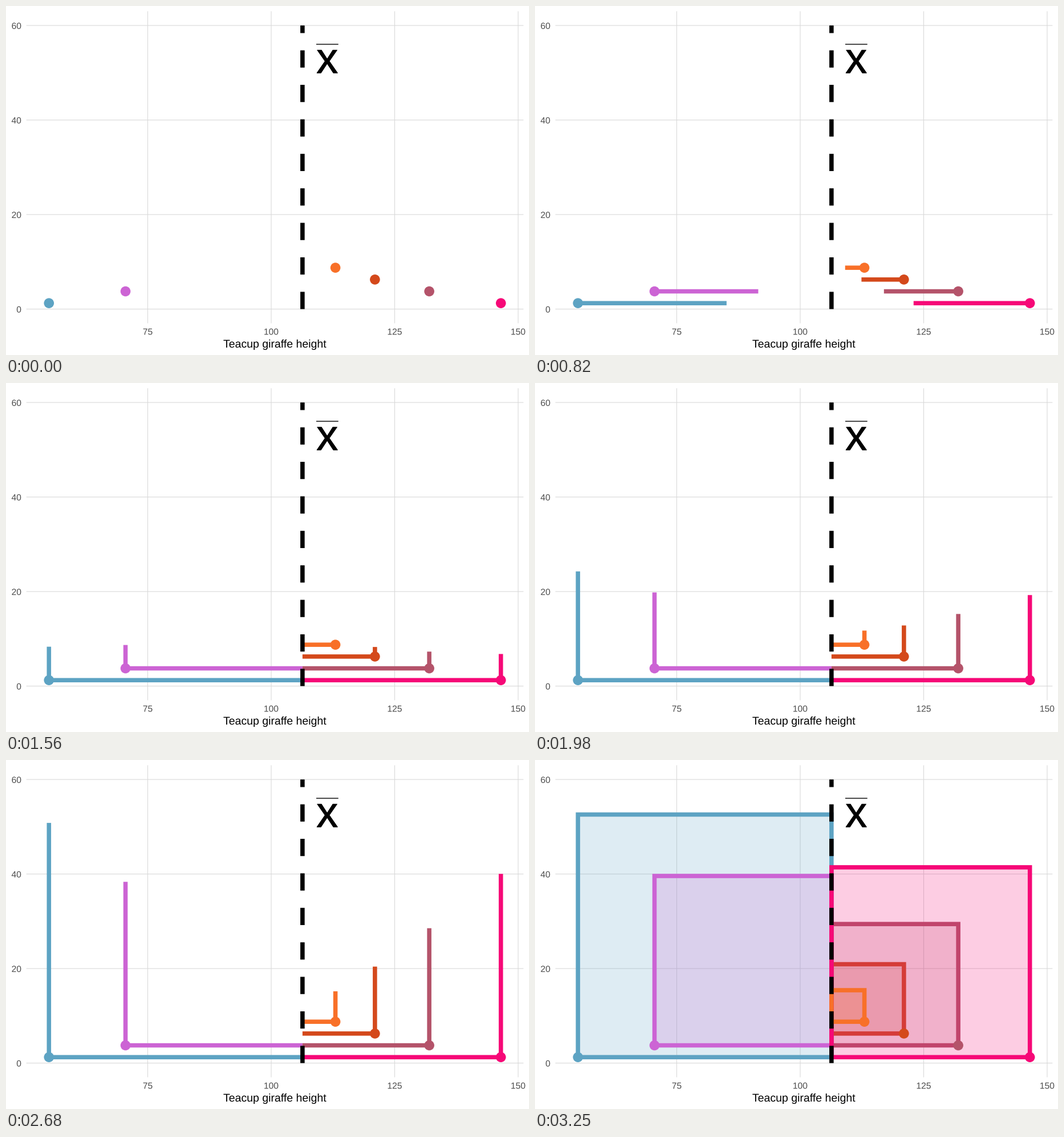
Write a matplotlib script that moves like this. It is 917 px wide and 611 px high and loops after 3.5 s.

```python
import numpy as np
import matplotlib.pyplot as plt
from matplotlib.animation import FuncAnimation
from matplotlib.patches import Circle, Rectangle
from matplotlib.patheffects import Normal, withStroke

W, H, DPI = 917, 611, 64
PT = 72 / DPI            # points per pixel
TICK_MS, LOOP_MS = 10, 3500
GROW, FADE = 29, 10      # steps per growing line and for the fade
STROKE = 7.55
UNIT_Y = 8.275           # pixels per unit of height

plt.rcParams["font.family"] = "Liberation Sans"


def px(x):
    return 465.0 + (x - 100) * 8.66


def py(y):
    return 530.6 - y * UNIT_Y


# height, level, colour; listed from back to front
POINTS = [
    (55.0, 1.25, "#5DA3C3"),
    (70.5, 3.75, "#CC64D4"),
    (121.0, 6.25, "#D4491B"),
    (132.0, 3.75, "#B4536A"),
    (146.5, 1.25, "#F60877"),
    (113.0, 8.75, "#F87028"),
]
MEAN = np.mean([p[0] for p in POINTS])

# How long each step stays: every third one lingers
grow_holds = [100 if k % 3 == 1 else 20 for k in range(2 * GROW + 2)]
fade_holds = [100 if k > 1 and k % 3 == 1 else 20 for k in range(1, FADE + 1)]
fade_holds[2] = 30
ENDS = np.cumsum(grow_holds + fade_holds + [250])
LAST = len(ENDS) - 1

fig = plt.figure(figsize=(W / DPI, H / DPI), dpi=DPI, facecolor="white")
ax = fig.add_axes([0, 0, 1, 1])
ax.set_xlim(0, W)
ax.set_ylim(H, 0)
ax.axis("off")


def line(xs, ys, color, width, z, **kw):
    return ax.plot(xs, ys, color=color, lw=width * PT, zorder=z, snap=False,
                   solid_capstyle="butt", dash_capstyle="butt", **kw)[0]


def label(x, y, text, size, color="black", ha="center", effect=Normal()):
    # Path effects draw the glyphs as outlines, free of pixel snapping
    ax.text(x, y, text, fontsize=size * PT, color=color, ha=ha,
            va="baseline", zorder=8, path_effects=[effect])


# Grid and axis labels
for v in (75, 100, 125, 150):
    line([px(v)] * 2, [py(63), py(-3)], "#D9D9D9", 1.1, 1)
    label(px(v), 575.5, str(v), 15.6, "#4D4D4D")
for v in (0, 20, 40, 60):
    line([px(50.425), px(151.075)], [py(v)] * 2, "#D9D9D9", 1.1, 1)
    label(27, py(v) + 6, str(v), 15.6, "#4D4D4D", "right")
label(471.7, 598, "Teacup giraffe height", 19.5)

# Mean line and its symbol
line([px(MEAN)] * 2, [py(0), py(60)], "black", STROKE, 6, linestyle=(0, (4, 4)))
label(544.2, 117.3, "x", 76, ha="left",
      effect=withStroke(linewidth=0.9, foreground="black"))
line([544, 582.7], [67, 67], "black", 1.4, 8)


class Deviation:
    """A point, its distance to the mean and the square on that distance."""

    def __init__(self, value, level, color):
        self.x, self.y, self.color = px(value), py(level), color
        self.dx = px(MEAN) - self.x
        self.dy = -abs(MEAN - value) * UNIT_Y
        self.square = ax.add_patch(Rectangle(
            (self.x, self.y), self.dx, self.dy, lw=STROKE * PT,
            joinstyle="miter", snap=False, zorder=3))
        self.across = line([], [], color, STROKE, 4)
        self.up = line([], [], color, STROKE, 4)
        ax.add_patch(Circle((self.x, self.y), 8.8, lw=0, color=color, zorder=5))

    def update(self, h, v, alpha, done):
        x, y = self.x, self.y
        self.across.set_data([x, x + self.dx * h], [y, y])
        self.up.set_data([x, x], [y, y + self.dy * v])
        self.across.set_visible(h > 0 and not done)
        self.up.set_visible(v > 0 and not done)
        self.square.set_visible(alpha > 0)
        self.square.set_facecolor((self.color, 0.2 * alpha))
        self.square.set_edgecolor((self.color, alpha))


deviations = [Deviation(*p) for p in POINTS]


def draw(n):
    k = int(np.searchsorted(ENDS, n * TICK_MS, side="right"))
    h = min(k / GROW, 1)
    v = np.clip((k - GROW - 1) / GROW, 0, 1)
    alpha = np.clip((k - 2 * GROW - 1) / FADE, 0, 1)
    for d in deviations:
        d.update(h, v, alpha, k == LAST)
    return []


anim = FuncAnimation(fig, draw, frames=LOOP_MS // TICK_MS, interval=TICK_MS,
                     init_func=lambda: draw(0), repeat=True, repeat_delay=0)
plt.show()
```
